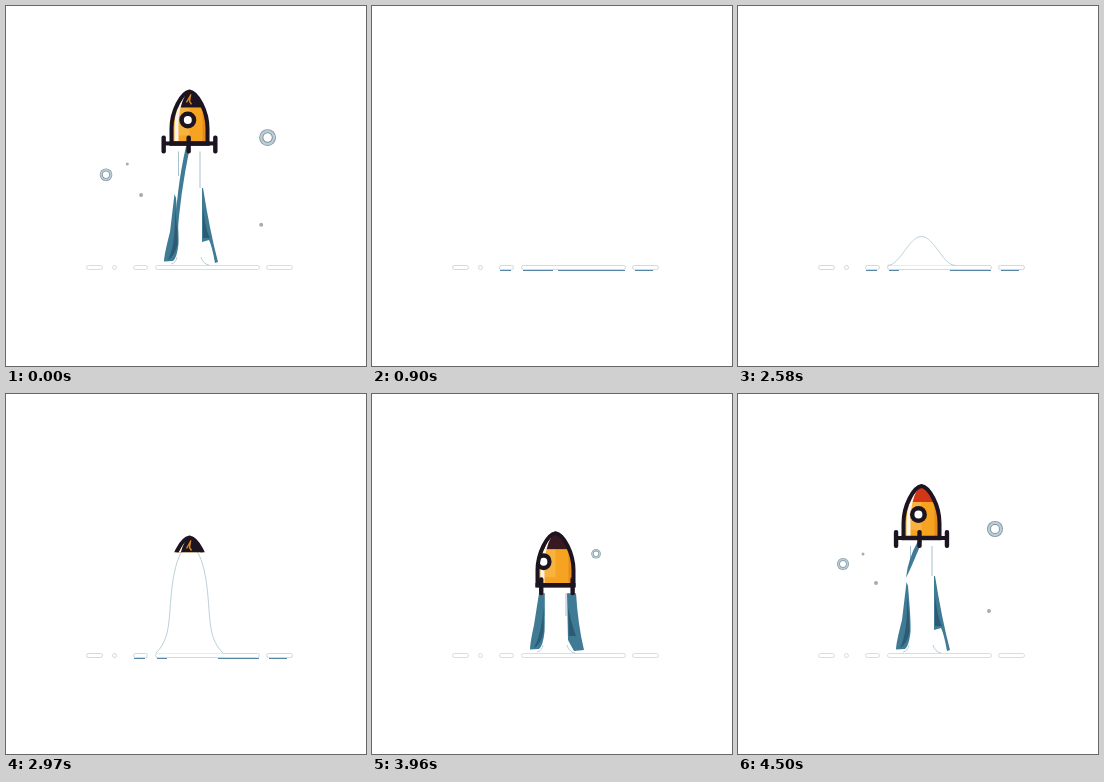
Animation of 360 by 360 pixels, one loop 4530 ms. Source, as an HTML page with a canvas:

```html
<!DOCTYPE html>
<html lang="en">
<head>
<meta charset="utf-8">
<title>Rocket launch</title>
<style>
html, body { margin: 0; width: 100%; height: 100%; overflow: hidden; background: #fff; }
canvas { display: block; width: 360px; height: 360px; }
</style>
</head>
<body>
<canvas id="stage" width="360" height="360"></canvas>
<script>
const ctx = document.getElementById('stage').getContext('2d');
const LOOP = 4530, STEP = 30, CX = 183.5, FLOOR = 259.5;
const DARK = '#1c1420', BLUE = '#407b95', DEEP = '#2d5b74', PALE = '#a9c3d0';

const clamp = v => Math.max(0, Math.min(1, v));
const mix = (a, b, k) => a + (b - a) * k;
const ramp = (t, a, b) => clamp((t - a) / (b - a));
const smooth = (t, a, b) => { const k = ramp(t, a, b); return k * k * (3 - 2 * k); };

// The launch accelerates exponentially and drives the spin and the bits.
const liftAt = u => 54 * Math.exp((u - 4500) / 262);
const driftAt = u => (liftAt(u) - 7) / 47;
const turnAt = u => (-46 + 0.67 * liftAt(u) - 85 * (1 - smooth(u, 2850, 3390))) * Math.PI / 180;

// A slow swell, a surge past the hover height, a settling, then the launch.
function topAt(u) {
  const swell = 9 * smooth(u, 1800, 2310) + 126 * smooth(u, 1800, 2000) / (1 + Math.exp((2765 - u) / 111));
  return FLOOR - swell + 19.5 * smooth(u, 3090, 3450) - liftAt(u);
}

function shape(d, fill, stroke, width = 1) {
  const p = new Path2D(d);
  if (fill) { ctx.fillStyle = fill; ctx.fill(p); }
  if (stroke) { ctx.strokeStyle = stroke; ctx.lineWidth = width; ctx.stroke(p); }
}

function disc(x, y, r, fill) {
  ctx.beginPath();
  ctx.arc(x, y, r, 0, 7);
  ctx.fillStyle = fill;
  ctx.fill();
}

function pill(x, y, w, h, r) {
  ctx.beginPath();
  ctx.roundRect(x, y, w, h, r);
}

function drawGround(u) {
  const wet = u > 480 && u < 3200 || u > 5000;
  ctx.globalAlpha = wet ? 1 : mix(1, 0.55, ramp(u, LOOP, 4800));
  ctx.lineWidth = 0.7;
  ctx.strokeStyle = wet ? '#bccad2' : '#c9cfd2';
  for (const [a, b] of [[80, 97], [106, 111], [127, 142], [149, 254], [260, 287]]) {
    pill(a + 0.5, FLOOR, b - a - 1, 4, 2);
    ctx.stroke();
  }
  ctx.globalAlpha = 1;
  if (!wet) return;
  const gap = ramp(u, 1800, 2500);
  shape(`M128 264.5H139M151 264.5H${mix(181, 161, gap)}M${mix(186, 212, gap)} 264.5H253M263 264.5H281`,
    null, '#5686a5');
}

// A bell of liquid that tightens into a column.
function drawSwell(u, top) {
  const h = FLOOR - top, tight = smooth(u, 2580, 2880);
  if (h < 1) return;
  ctx.beginPath();
  for (let i = -40; i <= 40; i++) {
    const f = 1 - Math.abs(i) / 40;
    const bell = 34 * Math.acos(2 * f - 1) / Math.PI;
    const column = 20 * Math.sqrt(1 - f ** 3) + 14 * (1 - f) ** 8;
    ctx.lineTo(CX + Math.sign(i) * mix(bell, column, tight), FLOOR - h * f);
  }
  ctx.fillStyle = '#fff';
  ctx.fill();
  ctx.strokeStyle = PALE;
  ctx.lineWidth = 0.8;
  ctx.stroke();
}

function drawLegs(u, base) {
  const y = Math.max(base + 8, 188) + 74 * ramp(u, LOOP, 4680) ** 2;
  if (y > 254) return;
  const thin = ramp(u, 4230, 4500), mid = mix(y, 257, 0.55);
  const inner = mix(172.5, 170, thin), heel = mix(250, 240, thin);
  const left = mix(167, 168.5, thin), right = mix(195, 196, thin);
  ctx.globalAlpha = ramp(u, 3060, 3300);
  shape(`M${left} ${y}L${inner} ${y + thin * 4}Q173 ${mid} 172.5 238Q171 252 167 255
    L158 255.5Q158 249 ${mix(162, 164, thin)} ${mid}Z`, BLUE);
  shape(`M${inner - 1} ${y + 14}Q172 ${mid} 171.5 238Q169 250 162 254Q170 238 ${inner - 1} ${y + 14}Z`, DEEP);
  shape(`M${right} ${y - 6 * thin}L${mix(204, 197, thin)} ${y - 6 * thin}Q${mix(206, 204, thin)} ${mid} 212 256
    L${mix(202, 209, thin)} 257Q${mix(198, 206, thin)} ${heel} ${mix(195, 203, thin)} ${heel - 6}L196 ${heel - 4}Z`, BLUE);
  shape(`M${right + 1} ${y + 14}Q200 ${mid} 204 ${heel - 8}L197 ${heel - 8}Z`, DEEP);
  shape('M165 258Q170 257 171 251M195 251Q197 258 203 259', null, PALE, 0.8);
  ctx.globalAlpha = 1;
}

// Threads between rocket and legs, with one strand that twists into the left leg.
function drawThreads(u, y) {
  const k = ramp(u, 4200, 4500), twist = ramp(u, 4440, LOOP);
  ctx.globalAlpha = ramp(u, 3200, 3400);
  shape(`M172.5 ${y}V${mix(222, 170, k)}M194 ${y}V${mix(222, 182, k)}`, null, '#91b2c1', 0.8);
  ctx.globalAlpha = 1;
  if (twist > 0) {
    const end = mix(y + 8, 240, twist ** 3);
    shape(`M180 ${y - 5}H184Q${mix(181, 174, twist)} ${mix(y, end, 0.45)} 171 ${end - 6}L168 ${end}
      Q170 ${mix(y, end, 0.4)} 180 ${y - 5}Z`, BLUE);
  }
}

function drawColumn(u, y) {
  const end = 260 - 84 * (Math.max(0, u - LOOP - 60) / 210) ** 1.65;
  if (end < y) return;
  const fade = ctx.createRadialGradient(CX, end - 28, 8, CX, end - 22, 24);
  fade.addColorStop(0, '#fff');
  fade.addColorStop(0.5, '#f1f1ec');
  fade.addColorStop(1, '#7f9ba5');
  const neck = y + Math.min(58, (end - y) / 2), top = y - 6;
  shape(`M173 ${top}H194V${end - 18}C194 ${end - 4} 188 ${end} 183 ${end}
    C178 ${end} 173 ${end - 4} 173 ${end - 18}Z`, '#fff', '#5d8b9f');
  ctx.fillStyle = fade;
  pill(173.5, Math.max(top, end - 28), 20, Math.min(27.5, end - top), [0, 0, 10, 10]);
  ctx.fill();
  shape(`M165 ${top}H173V${neck}Q167 ${neck - 28} 165 ${top}Z
    M195 ${top}H204Q202 ${neck - 30} 194 ${neck}L191 ${neck - 10}Q196 ${neck - 32} 195 ${top}Z`, BLUE);
  const tip = Math.min(neck + 50, end - 12);
  shape(`M194 ${neck - 4}V${neck + 32}`, null, BLUE, 1.5);
  shape(`M191 ${neck - 4}L195 ${neck - 4}L182 ${tip}L181 ${tip - 2}Z`, '#5688a0');
}

const HULL = 'M0 2C8 3 18 22 18 39V54H-18V39C-18 22 -8 3 0 2Z';

function drawFins(turn, front) {
  for (let i = 0; i < 4; i++) {
    const a = turn + i * Math.PI / 2, depth = Math.cos(a), s = Math.sin(a);
    if (depth < -0.2 || depth > 0.2 !== front) continue;
    const x = 26 * s * Math.abs(s) ** 0.45;
    if (!front) shape(`M0 54H${x}`, null, DARK, 4);
    pill(x - 2.2, 46, 4.4, 18, 2);
    ctx.fillStyle = DARK;
    ctx.fill();
  }
}

function drawRocket(u, top) {
  const turn = turnAt(u), facing = Math.cos(turn);
  const warm = smooth(u, 3900, 4140) * (u < 4515);
  const gold = ramp(u, 4560, 4740);
  const band = (x, y, w, h, fill) => { ctx.fillStyle = fill; ctx.fillRect(x, y, w, h); };
  ctx.save();
  ctx.translate(CX, top);
  drawFins(turn, false);
  ctx.save();
  ctx.clip(new Path2D(HULL));
  band(-20, 0, 40, 56, '#f6a322');
  band(-11, 18, 11, 28, '#f8b240');
  band(13, 14, 6, 40, '#e88b1b');
  ctx.globalAlpha = gold;
  band(-20, 0, 40, 56, '#f2bd4b');
  ctx.globalAlpha = 1;
  band(-20, 0, 40, 18, `rgb(${mix(28, 207, warm)}, ${mix(20, 55, warm)}, ${mix(32, 23, warm)})`);
  if (!warm) shape('M-3 13L1 6L0 12L2 15', null, '#dc861f', 1.4);
  shape('M-4 5Q-15 19 -15 37V52H-11V36Q-11 18 -4 5Z', '#fff4e9');
  if (facing > -0.1) {
    ctx.translate(18 * Math.sin(turn), 30.5);
    ctx.scale(0.75 + 0.25 * facing, 1);
    disc(0, 0, 8.5, DARK);
    disc(0, 0, 4, '#fff');
  }
  ctx.restore();
  shape(HULL, null, DARK, 4);
  shape('M-20 54H20', null, DARK, 4.5);
  drawFins(turn, true);
  ctx.restore();
}

// Offset from the burst centre, radius, and the drift at which each bit is gone.
const BITS = [
  { x: 73, y: -55, r: 8, life: 2.4 }, { x: -79, y: -20, r: 6, life: 1.8 }, { x: 37, y: -96, r: 4, life: 1.1 },
  { x: -46, y: -1, r: 2, life: 1.6 }, { x: 67, y: 27, r: 2, life: 1.6 }, { x: -59, y: -30, r: 1.5, life: 1.6 },
  { x: -61, y: -68, r: 1.2, life: 1.1 }, { x: -73, y: 20, r: 1.5, life: 1.1 }
];

function drawBits(u) {
  const q = driftAt(u), spread = 0.55 + 0.45 * q;
  for (const { x, y, r, life } of BITS) {
    const born = r > 7 ? -0.13 : r > 2 ? 0 : 0.35;
    if (q < born || q > life) continue;
    const size = r * (r > 2 ? Math.min(1.05, 0.6 + 0.4 * q) : 1) * (1 - ramp(q, 1.3, life + 0.1));
    const ring = (k, fill) => disc(184 + x * spread, 190 + y * spread, size * k, fill);
    if (r <= 2) { ring(1, '#a3aeb4'); continue; }
    ring(1, '#7d97a5');
    ring(0.9, '#bfcdd4');
    ring(0.62, '#7d97a5');
    ring(0.5, size < 4.5 ? '#48616f' : '#fff');
  }
}

function draw(time) {
  const t = Math.floor(time % LOOP / STEP) * STEP;
  const u = t < 480 ? t + LOOP : t;
  const top = topAt(u), base = top + 54;
  ctx.fillStyle = '#fff';
  ctx.fillRect(0, 0, 360, 360);
  drawGround(u);
  if (u < 1800) return;
  if (u < 2940) return drawSwell(u, top);
  if (u > 3420) drawBits(u);
  (u < 4545 ? drawThreads : drawColumn)(u, base + 8);
  drawLegs(u, base);
  if (u > 3300) return drawRocket(u, top);
  const level = mix(top, base + 10, ramp(u, 2910, 3270));
  drawSwell(u, level);
  ctx.save();
  ctx.beginPath();
  ctx.rect(0, 0, 360, level + 6);
  ctx.clip();
  drawRocket(u, top);
  ctx.restore();
}

const began = performance.now();
function frame() {
  draw(performance.now() - began);
  requestAnimationFrame(frame);
}
frame();
</script>
</body>
</html>
```
